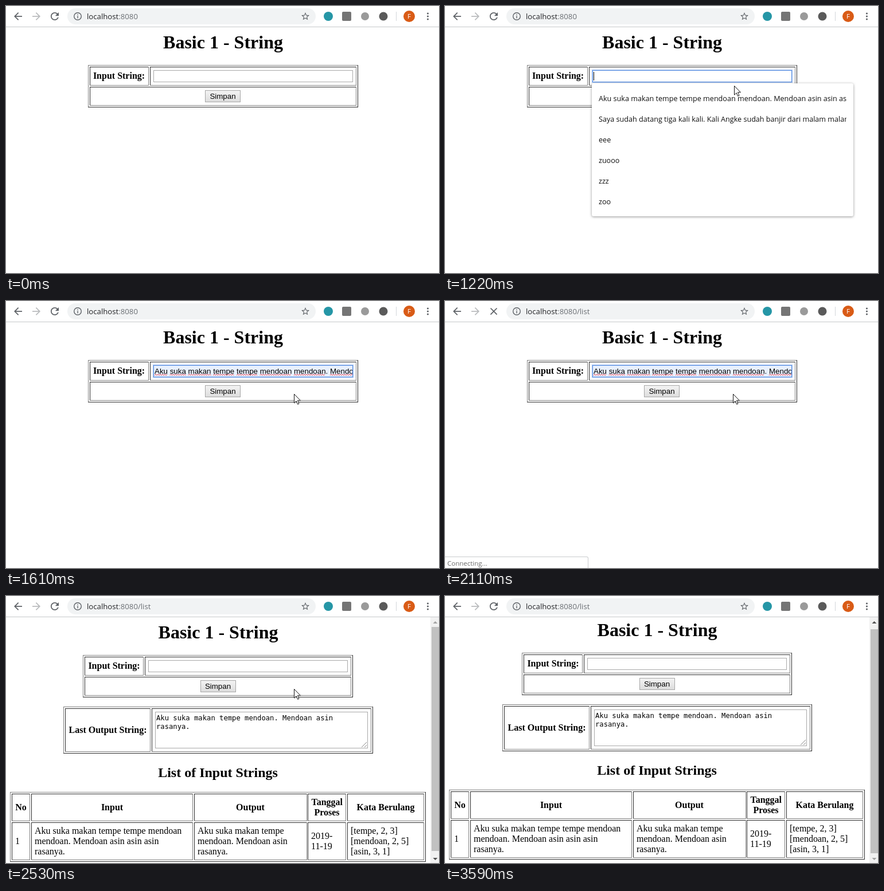
Recreate the animation shown at these times as an HTML page with a canvas. Size 755x466 px, loop 3.77 s.

```html
<!DOCTYPE html>
<html lang="id">
<head>
<meta charset="utf-8">
<title>Basic 1 - String</title>
<style>
html, body { margin: 0; width: 755px; height: 466px; overflow: hidden; background: #fff; }
canvas { display: block; }
</style>
</head>
<body>
<canvas id="stage" width="755" height="466"></canvas>
<script>
const W = 755, H = 466, LOOP = 3770, TOP = 37;
const c = document.getElementById('stage').getContext('2d');
const SERIF = '"Liberation Serif", "Times New Roman", serif';
const SANS = '"Liberation Sans", Arial, sans-serif';
const UI = '"Open Sans", "Noto Sans", sans-serif';
const MONO = '"DejaVu Sans Mono", monospace';
const GRAY = '#808080', DARK = '#2c2c2c', ICON = '#5f6368';
const SENTENCE = 'Aku suka makan tempe tempe mendoan mendoan. Mendoan asin asin asin rasanya.';
const CHOICES = [
  SENTENCE,
  'Saya sudah datang tiga kali kali. Kali Angke sudah banjir dari malam malam.',
  'eee', 'zuooo', 'zzz', 'zoo'
];

const icons = {
  back: new Path2D('M20 11H7.83l5.59-5.59L12 4l-8 8 8 8 1.41-1.41L7.83 13H20v-2z'),
  reload: new Path2D('M17.65 6.35C16.2 4.9 14.21 4 12 4c-4.42 0-7.99 3.58-7.99 8s3.57 8 7.99 8c3.73 0 6.84-2.55 7.73-6h-2.08c-.82 2.33-3.04 4-5.65 4-3.31 0-6-2.69-6-6s2.69-6 6-6c1.66 0 3.14.69 4.22 1.78L13 11h7V4l-2.35 2.35z'),
  stop: new Path2D('M19 6.41L17.59 5 12 10.59 6.41 5 5 6.41 10.59 12 5 17.59 6.41 19 12 13.41 17.59 19 19 17.59 13.41 12z'),
  star: new Path2D('M22 9.24l-7.19-.62L12 2 9.19 8.63 2 9.24l5.46 4.73L5.82 21 12 17.27 18.18 21l-1.63-7.03L22 9.24zM12 15.4l-3.76 2.27 1-4.28-3.32-2.88 4.38-.38L12 6.1l1.71 4.04 4.38.38-3.32 2.88 1 4.28L12 15.4z'),
  arrow: new Path2D('M.5.5V16.2L4.1 12.7 6.6 18.3 9 17.2 6.5 11.7H11.4z')
};

function rect(x, y, w, h, color) {
  c.fillStyle = color;
  c.fillRect(x, y, w, h);
}

function frame(x, y, w, h, color) {
  c.strokeStyle = color;
  c.lineWidth = 1;
  c.strokeRect(x + .5, y + .5, w - 1, h - 1);
}

function disc(x, y, r, color) {
  c.fillStyle = color;
  c.beginPath();
  c.arc(x, y, r, 0, 7);
  c.fill();
}

function pill(x, y, w, h, r, color) {
  c.fillStyle = color;
  c.beginPath();
  c.roundRect(x, y, w, h, r);
  c.fill();
}

function text(s, x, y, font, color = '#000', align = 'left') {
  c.font = font;
  c.fillStyle = color;
  c.textAlign = align;
  c.fillText(s, x, y);
}

function clipped(x, y, w, h, draw) {
  c.save();
  c.beginPath();
  c.rect(x, y, w, h);
  c.clip();
  draw();
  c.restore();
}

function icon(name, x, y, scale, color = ICON, flip = 1) {
  c.save();
  c.translate(x, y);
  c.scale(scale * flip, scale);
  c.translate(-12, -12);
  c.fillStyle = color;
  c.fill(icons[name]);
  c.restore();
}

// Two-tone table border given by its edges.
function bevel(x1, y1, x2, y2, light, dark) {
  rect(x1, y1, x2 - x1, 1, light);
  rect(x1, y1, 1, y2 - y1, light);
  rect(x1, y2 - 1, x2 - x1, 1, dark);
  rect(x2 - 1, y1, 1, y2 - y1, dark);
}
const outer = (...e) => bevel(...e, GRAY, DARK);
const cell = (...e) => bevel(...e, DARK, GRAY);

const bold = (s, x, y, size = 16) => text(s, x, y, `bold ${size}px ${SERIF}`, '#000', 'center');
const lines = (list, x, y) => list.forEach((s, i) => text(s, x, y + i * 18, `16px ${SERIF}`));

function toolbar(t) {
  rect(0, 0, W, TOP, '#fff');
  rect(0, 36, W, 1, '#c6c8ca');
  icon('back', 21, 18, .875);
  icon('back', 53, 18, .875, '#babcbe', -1);
  icon(t >= 1880 && t < 2250 ? 'stop' : 'reload', 85, 18, .875);
  pill(107, 4, 433, 28, 14, '#f1f3f4');
  c.strokeStyle = ICON;
  c.lineWidth = 1.4;
  c.beginPath();
  c.arc(125, 18, 6.3, 0, 7);
  c.stroke();
  rect(124.3, 17.2, 1.4, 4.2, ICON);
  rect(124.3, 14.5, 1.4, 1.5, ICON);
  const font = `13.2px ${UI}`;
  text('localhost', 141, 23, font, '#202124');
  text(t < 2110 ? ':8080' : ':8080/list', 141 + c.measureText('localhost').width, 23, font, '#6b6f74');
  icon('star', 522, 18, .7);
  disc(562, 18, 8, '#2596a6');
  pill(586, 10, 16, 16, 2, '#757575');
  disc(626, 18, 7, '#9a9a9a');
  disc(658, 18, 7.5, '#5a5a5a');
  rect(680, 10, 1, 16, '#d3d6da');
  disc(703, 18, 10, '#d95b16');
  text('F', 703, 22, `11.5px ${UI}`, '#fff', 'center');
  for (const y of [13, 18, 23]) disc(735.5, y, 1.6, ICON);
}

function squiggle(x, w) {
  c.beginPath();
  for (let i = 0; i <= w; i += 2) c.lineTo(x + i, i % 4 ? 127.8 : 129.8);
  c.strokeStyle = '#e8303a';
  c.lineWidth = 1;
  c.stroke();
}

function inputText(spell) {
  clipped(258, 112, 346, 21, () => {
    const font = `13.333px ${SANS}`;
    text(SENTENCE, 259, 127, font);
    if (!spell) return;
    let x = 259;
    for (const word of SENTENCE.split(' ')) {
      squiggle(x, c.measureText(word.replace('.', '')).width);
      x += c.measureText(word + ' ').width;
    }
  });
}

function form(dx, mid) {
  bold('Basic 1 - String', mid, 74, 32);
  outer(143 + dx, 103, 614 + dx, 177);
  cell(146 + dx, 106, 249 + dx, 139);
  cell(251 + dx, 106, 611 + dx, 139);
  cell(146 + dx, 141, 611 + dx, 174);
  bold('Input String:', mid - 181.5, 127);
  frame(257 + dx, 112, 348, 21, '#a9a9a9');
  const x = Math.ceil(mid - 31.5), w = Math.floor(mid + 31) - x;
  const g = c.createLinearGradient(0, 147, 0, 168);
  g.addColorStop(0, '#f4f4f4');
  g.addColorStop(1, '#dcdcdc');
  rect(x, 147, w, 21, g);
  frame(x, 147, w, 21, '#a6a6a6');
  text('Simpan', mid - .5, 162, `13.333px ${SANS}`, '#000', 'center');
}

function dropdown(hover) {
  c.save();
  c.shadowColor = 'rgba(0,0,0,.42)';
  c.shadowBlur = 4;
  c.shadowOffsetY = 1;
  pill(256, 135, 456, 232, 3, '#fff');
  c.restore();
  if (hover) rect(256, 143, 456, 36, '#d9dce0');
  clipped(256, 135, 444, 232, () =>
    CHOICES.forEach((s, i) => text(s, 268, 166 + i * 36, `12.6px ${UI}`, '#111')));
}

function formPage(t, y) {
  form(0, 378.5);
  if (t < 760) return;
  const hover = t >= 1080 && y >= 143, filled = hover || t >= 1610;
  if (filled) rect(257, 112, 348, 21, '#e8f0fe');
  frame(256, 111, 350, 23, '#a5c3f3');
  frame(257, 112, 348, 21, '#5a8fe0');
  if (filled) inputText(t >= 1610);
  if (t < 1610) rect(259, 115, 1, 15, '#000');
  if (t >= 810 && t < 1610) dropdown(hover);
}

function listPage() {
  form(-9, 370);
  outer(100, 193, 640, 275);
  cell(103, 196, 252, 272);
  cell(254, 196, 637, 272);
  bold('Last Output String:', 177.5, 239);
  frame(260, 202, 371, 64, '#a9a9a9');
  text('Aku suka makan tempe mendoan. Mendoan asin', 262, 217, `12.2px ${MONO}`);
  text('rasanya.', 262, 232, `12.2px ${MONO}`);
  c.strokeStyle = '#888';
  c.lineWidth = 1;
  c.beginPath();
  for (const d of [4, 9]) {
    c.moveTo(629 - d, 264);
    c.lineTo(629, 264 - d);
  }
  c.stroke();

  bold('List of Input Strings', 369.5, 316, 24);
  outer(7, 342, 732, 464);
  for (const [x1, x2] of [[10, 42], [44, 326], [328, 525], [526, 593], [595, 729]]) {
    cell(x1, 345, x2, 393);
    cell(x1, 395, x2, 461);
  }
  bold('No', 26, 374);
  bold('Input', 185, 374);
  bold('Output', 426, 374);
  bold('Tanggal', 559.7, 365);
  bold('Proses', 559.5, 383);
  bold('Kata Berulang', 662, 374);
  lines(['1'], 16, 433);
  lines(['Aku suka makan tempe tempe mendoan', 'mendoan. Mendoan asin asin asin', 'rasanya.'], 50, 415);
  lines(['Aku suka makan tempe', 'mendoan. Mendoan asin', 'rasanya.'], 334, 415);
  lines(['2019-', '11-19'], 532, 424);
  lines(['[tempe, 2, 3]', '[mendoan, 2, 5]', '[asin, 3, 1]'], 601, 415);
}

function scrollbar(scroll) {
  const tip = (y, d, on) => {
    c.fillStyle = on ? '#505050' : '#a3a3a3';
    c.beginPath();
    c.moveTo(744.5, y + 2 * d);
    c.lineTo(752.5, y + 2 * d);
    c.lineTo(748.5, y - 2 * d);
    c.fill();
  };
  rect(740, TOP, 15, H - TOP, '#f1f1f1');
  rect(742, 54 + scroll, 13, 391, '#c1c1c1');
  tip(46, 1, scroll > 0);
  tip(459, -1, scroll === 0);
}

function status(t) {
  if (t < 2110 || t >= 2530) return;
  c.globalAlpha = t < 2430 ? 1 : t < 2480 ? .66 : .33;
  pill(-4, 446, 254, 26, 3, '#c9cbcd');
  pill(-4, 447, 253, 26, 2, '#fff');
  text('Connecting...', 4, 462, `11.5px ${UI}`, '#6a6a6a');
  c.globalAlpha = 1;
}

// Progress from 0 to 1 held in n equal steps, as a screen recorder samples it.
const stepped = (t, from, to, n) =>
  Math.max(0, Math.min(1, Math.floor((t - from) / (to - from) * n + 1e-6) / n));
const mix = (a, b, u) => a + (b - a) * u;
const bend = (a, m, b, u) => mix(mix(a, m, u), mix(m, b, u), u);

function pointer(t) {
  if (t < 180 || t >= 3590) return null;
  if (t < 1080) {
    const u = stepped(t, 180, 670, 9);
    return [bend(577, 430, 505, u), bend(300, 165, 122, u)];
  }
  if (t < 1610) {
    const u = stepped(t + 55, 1080, 1460, 7);
    return [mix(505, 502.5, u), mix(122, 162, u)];
  }
  const u = t < 3340 ? 0 : stepped(t + 50, 3340, 3590, 5);
  return [mix(502, 684, u), mix(162, 454, u ** 1.2)];
}

function cursor(t, [x, y]) {
  if (t >= 760 && t < 900 || t >= 1470 && t < 1610)
    disc(t < 900 ? 503 : 502, t < 900 ? 121 : 162, 12, 'rgba(250,245,0,.52)');
  x = Math.round(x);
  y = Math.round(y);
  if (t < 1610 && y > 111 && y < 134) {
    rect(x, y - 7, 1, 15, '#000');
    for (const e of [y - 8, y + 7]) {
      rect(x - 3, e, 3, 1, '#000');
      rect(x + 1, e, 3, 1, '#000');
    }
    return;
  }
  c.save();
  c.translate(x, y);
  c.fillStyle = '#fff';
  c.fill(icons.arrow);
  c.strokeStyle = '#111';
  c.lineWidth = 1;
  c.stroke(icons.arrow);
  c.restore();
}

function draw() {
  const t = performance.now() % LOOP;
  const at = pointer(t);
  rect(0, 0, W, H, '#fff');
  if (t < 2250) {
    formPage(t, at ? at[1] : 0);
  } else {
    const scroll = t < 2800 ? 0 : 4;
    c.save();
    c.translate(0, -scroll);
    listPage();
    c.restore();
    scrollbar(scroll);
  }
  status(t);
  toolbar(t);
  if (at) cursor(t, at);
  requestAnimationFrame(draw);
}
draw();
</script>
</body>
</html>
```
